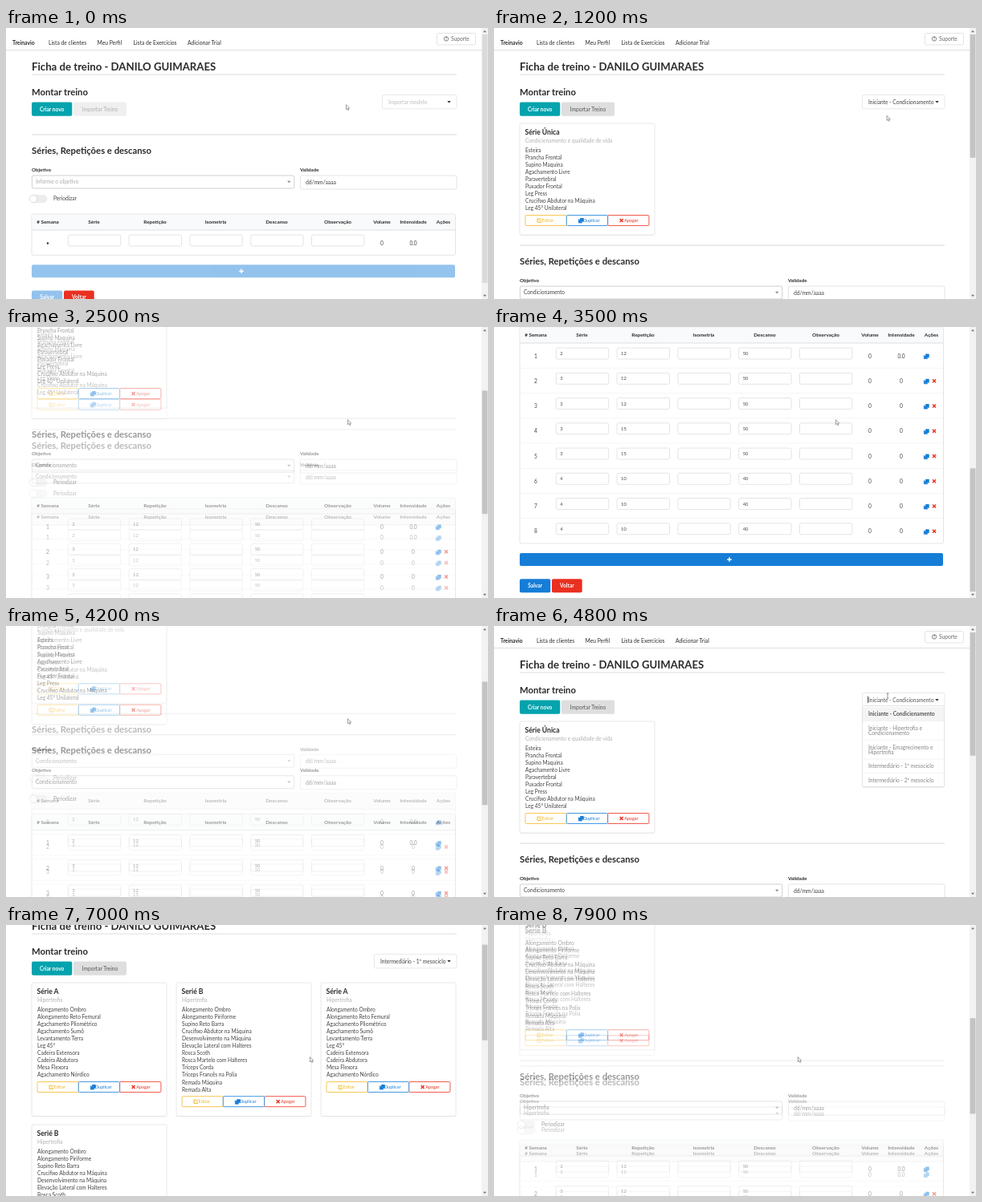
Write an HTML page that moves like this. It is 600x338 px and loops after 8 s.

```html
<!DOCTYPE html>
<html lang="pt-BR">
<head>
<meta charset="utf-8">
<title>Ficha de treino</title>
<style>
  html, body { margin: 0; width: 100%; height: 100%; overflow: hidden; background: #fff; }
  svg { display: block; width: 600px; height: 338px; font-family: Lato, "Open Sans", sans-serif; }
  text { white-space: pre; }
</style>
</head>
<body>
<svg id="stage" viewBox="0 0 600 338" xmlns="http://www.w3.org/2000/svg"></svg>
<script>
const LOOP = 8000, STEP = 100, SMEAR = 50;
const INK = '#2b2b2b', BODY = '#444', LINE = '#dedede';
const BLUE = '#167dd7', RED = '#ea3020', TEAL = '#05a3ad', GOLD = '#f4b928';

// Drawing helpers
const text = (x, y, s, o = {}) =>
  `<text x="${x}" y="${y}" font-size="${o.size || 6.6}" fill="${o.fill || (o.bold ? INK : BODY)}"` +
  ` font-weight="${o.bold ? 700 : 400}" text-anchor="${o.mid ? 'middle' : 'start'}">${s}</text>`;
const box = (x, y, w, h, fill, stroke = 'none', r = 2) =>
  `<rect x="${x}" y="${y}" width="${w}" height="${h}" rx="${r}" fill="${fill}" stroke="${stroke}" stroke-width=".8"/>`;
const rule = (y, x1 = 32, x2 = 561, c = LINE) =>
  `<path d="M${x1} ${y}H${x2}" stroke="${c}" stroke-width="1"/>`;
const arrow = (x, y, c = INK) => `<path d="M${x - 2.2} ${y - 1.2}h4.4l-2.2 2.5z" fill="${c}"/>`;
const faded = (on, s) => `<g opacity="${on ? .46 : 1}">${s}</g>`;
const button = (x, y, w, h, fill, s) =>
  box(x, y, w, h, fill) + text(x + w / 2, y + h / 2 + 2.4, s, { bold: 1, mid: 1, fill: '#fff' });

const icons = {
  copy: (x, y, c) => box(x + 1.8, y - 3, 4.6, 4.6, c, 'none', .5) +
    `<path d="M${x + .9} ${y - 1.2}h-.9v4.2h4.3v-.9" fill="${c}" stroke="${c}" stroke-width=".7"/>`,
  cross: (x, y, c) => `<path d="M${x} ${y - 2}l4 4m0-4l-4 4" stroke="${c}" stroke-width="1.5"/>`,
  edit: (x, y, c) => `<path d="M${x + 3} ${y - 2}h-3v4.4h4.4v-2M${x + 1.8} ${y + .8}l3.6-3.6" fill="none" stroke="${c}" stroke-width="1"/>`
};

// Content
const seriesA = ['Série A', 'Hipertrofia', 'Alongamento Ombro', 'Alongamento Reto Femural', 'Agachamento Pliométrico',
  'Agachamento Sumô', 'Levantamento Terra', 'Leg 45°', 'Cadeira Extensora', 'Cadeira Abdutora', 'Mesa Flexora',
  'Agachamento Nórdico'];
const seriesB = ['Serié B', 'Hipertrofia', 'Alongamento Ombro', 'Alongamento Piriforme', 'Supino Reto Barra',
  'Crucifixo Abdutor na Máquina', 'Desenvolvimento na Máquina', 'Elevação Lateral com Halteres', 'Rosca Scoth',
  'Rosca Martelo com Halteres', 'Tríceps Corda', 'Tríceps Francês na Polia', 'Remada Máquina', 'Remada Alta'];
const single = ['Série Única', 'Condicionamento e qualidade de vida', 'Esteira', 'Prancha Frontal', 'Supino Maquina',
  'Agachamento Livre', 'Paravertebral', 'Puxador Frontal', 'Leg Press', 'Crucifixo Abdutor na Máquina',
  'Leg 45° Unilateral'];
const weeks = [[2, 12, 50], [3, 12, 50], [3, 12, 50], [3, 15, 50], [3, 15, 50], [4, 10, 40], [4, 10, 40], [4, 10, 40]];

const views = [
  { shift: 0, rows: 1, cards: [] },
  { shift: 138, rows: 8, goal: 'Condicionamento', cards: [[32, 119, 139, single]] },
  { shift: 343, rows: 8, goal: 'Hipertrofia', cards: [[32, 119, 166.5, seriesA], [212, 119, 166.5, seriesB],
    [392, 119, 166.5, seriesA], [32, 296, 166.5, seriesB]] }
];
views.forEach(v => v.height = 320 + v.shift + v.rows * 31.25);

function card([x, y, h, [name, note, ...items]]) {
  const top = y + 114.5 + 9.06 * (items.length - 9);
  const actions = [['edit', 'Editar', GOLD], ['copy', 'Duplicar', BLUE], ['cross', 'Apagar', RED]];
  const order = [0, 2, 1];
  return box(x, y + .8, 168, h, '#ececec') + box(x, y, 168, h, '#fff', '#e3e3e3') +
    text(x + 6.5, y + 13.9, name, { size: 8.6, bold: 1 }) +
    text(x + 7, y + 23.7, note, { fill: '#b0b0b0' }) +
    items.map((s, i) => text(x + 7, y + 35.9 + 9.06 * i, s)).join('') +
    order.map(i => {
      const [icon, label, c] = actions[i], bx = x + 7 + 51.3 * i;
      return box(bx, top, 51.3, 13, '#fff', c, 1.2) + icons[icon](bx + 15, top + 6.5, c) +
        text(bx + 20.6, top + 8.6, label, { size: 5.6, fill: c });
    }).join('');
}

function header() {
  const links = [[53, 'Lista de clientes'], [113.5, 'Meu Perfil'], [158.5, 'Lista de Exercícios'], [226, 'Adicionar Trial']];
  return text(8, 20.8, 'Treinavio', { bold: 1, size: 6.8 }) +
    links.map(([x, s]) => text(x, 20.8, s, { size: 6.75, fill: INK })).join('') +
    rule(27.5, 0, 592) + box(536.5, 6.5, 48, 14.5, '#fff', LINE) +
    '<circle cx="548" cy="13.5" r="2.7" fill="none" stroke="#666" stroke-width=".8"/>' +
    text(548, 15.3, '?', { size: 4.6, mid: 1, bold: 1, fill: '#666' }) + text(554, 15.9, 'Suporte', { fill: '#666' }) +
    text(32, 52.8, 'Ficha de treino - DANILO GUIMARAES', { size: 13.2, bold: 1 }) + rule(58) +
    text(32, 84, 'Montar treino', { size: 11.3, bold: 1 }) + button(32, 92.6, 50.3, 17.2, TEAL, 'Criar novo');
}

function table(v) {
  const empty = v.rows === 1, end = 252 + v.rows * 31.25;
  const heads = [[52, '# Semana'], [109.5, 'Série'], [185.5, 'Repetição'], [261, 'Isometria'], [337, 'Descanso'],
    [413, 'Observação'], [468, 'Volume'], [507, 'Intensidade'], [544.5, 'Ações']];
  const row = (week, i) => {
    const y = 252 + 31.25 * i, values = [week[0], week[1], '', week[2], ''];
    return (i ? rule(y, 32, 559, '#f5f5f5') : '') +
      text(52, y + 18.6, empty ? '•' : i + 1, { mid: 1 }) +
      values.map((n, k) => box(77.3 + 75.8 * k, y + 6, 65.4, 14, '#fff', LINE) +
        (empty ? '' : text(82.3 + 75.8 * k, y + 15, n, { size: 5.8 }))).join('') +
      text(468, y + 18.6, 0, { mid: 1 }) + text(507, y + 18.6, i ? '0' : '0.0', { mid: 1 }) +
      (empty ? '' : icons.copy(535.3, y + 16.6, BLUE)) + (i ? icons.cross(546, y + 16, RED) : '');
  };
  return box(32, 232, 527.5, end - 232, '#fff', LINE) + box(32.4, 232.4, 526.7, 19.4, '#f9fafb') + rule(252, 32, 559) +
    heads.map(([x, s]) => text(x, 244, s, { size: 6.4, bold: 1, mid: 1 })).join('') +
    weeks.slice(0, v.rows).map(row).join('') +
    faded(empty, box(32, end + 12, 527, 16, BLUE) +
      `<path d="M290.2 ${end + 20}h5.6m-2.8-2.8v5.6" stroke="#fff" stroke-width="1.5"/>`) +
    faded(empty, button(32, end + 44.3, 38.3, 17, BLUE, 'Salvar')) + button(72, end + 44.3, 37.7, 17, RED, 'Voltar');
}

function form(v) {
  return `<g transform="translate(0 ${v.shift})">` + rule(133, 32, 561, '#d6d6d6') +
    text(32, 156.8, 'Séries, Repetições e descanso', { size: 11.3, bold: 1 }) +
    text(32, 179.2, 'Objetivo', { size: 6.2, bold: 1 }) + text(366, 179.2, 'Validade', { size: 6.2, bold: 1 }) +
    box(32.4, 184, 326.4, 16, '#fff', '#c4c4c4') +
    text(37, 194.4, v.goal || 'Informe o objetivo', { fill: v.goal ? BODY : '#aaa' }) + arrow(352.3, 192, '#888') +
    box(366.4, 184, 194.6, 17, '#fff', LINE) + text(373, 195, 'dd/mm/aaaa', { size: 6.8 }) +
    box(30, 208, 21.5, 10, '#ececec', 'none', 5) +
    '<circle cx="34" cy="213" r="4.8" fill="#fff" stroke="#d4d4d4" stroke-width=".8"/>' +
    text(59, 215.2, 'Periodizar') + table(v) + '</g>';
}

const view = v => '<g class="view">' + box(0, 0, 600, 1000, '#fff', 'none', 0) + header() +
  faded(!v.goal, box(84, 92.6, 66, 17.2, '#dedede') + text(117, 103.8, 'Importar Treino', { mid: 1, fill: '#555' })) +
  v.cards.map(card).join('') + form(v) + '</g>';

const choices = ['Iniciante - Condicionamento', 'Intermediário - 1º mesociclo'];
const menu = '<g id="menu">' + box(458.4, 100.5, 102.2, 101, '#e0e0e0') + box(458.4, 99.5, 102.2, 101, '#fff', LINE) +
  box(459, 101, 101, 17.5, '#f4f4f4', 'none', 0) + text(466, 112.2, choices[0], { bold: 1, fill: '#555' }) +
  [[130, 'Iniciante - Hipertrofia e'], [136.4, 'Condicionamento'], [153.6, 'Iniciante - Emagrecimento e'],
    [160, 'Hipertrofia'], [177.2, choices[1]], [194.6, 'Intermediário - 2º mesociclo']]
    .map(([y, s]) => text(466, y, s, { fill: '#858585' })).join('') +
  [118.5, 142, 166, 183.5].map(y => rule(y, 459, 560, '#f3f3f3')).join('') +
  '<path d="M465.5 87.5v8.5" stroke="#333" stroke-width=".8"/></g>';
const picker = '<g id="picker"><rect id="field" y="83.4" height="17.4" rx="2" fill="#fff" stroke="#e3e3e3" stroke-width=".8"/>' +
  '<text id="label" y="94.6" font-size="6.6"></text>' + arrow(551.5, 92.2) + menu + '</g>';

const pointer = '<path class="tip" d="M-1.6-3.4v6l1.4-1.2 1 2.2 1-.5-1-2h1.8z" fill="#fff" stroke="#777" stroke-width=".7"/>' +
  '<path class="beam" d="M-1.3-3h2.6M0-3v6M-1.3 3h2.6" fill="none" stroke="#666" stroke-width=".7"/>';

const $ = id => document.getElementById(id);
$('stage').innerHTML =
  `<g id="world"><g id="main"><g id="page">${views.map(view).join('')}${picker}</g></g>` +
  '<g id="trail" opacity=".4"><use href="#page"/></g></g>' +
  box(592, 0, 8, 338, '#f2f2f2', 'none', 0) + '<path d="M594 5.3h4l-2-2.5zM594 332.7h4l-2 2.5z" fill="#777"/>' +
  '<rect id="thumb" x="592.6" width="6.8"/>' +
  `<g id="cursor">${pointer}</g><g id="echo" opacity=".5">${pointer}</g>`;
const layers = [...document.querySelectorAll('.view')];

// Timeline
const scrolls = [[0, 0], [1850, 0], [2100, 47], [2700, 212], [3250, 355], [3400, 370], [3750, 370], [4100, 188],
  [4400, 30], [4550, 0], [6600, 0], [6850, 47], [7150, 47], [7350, 141], [7600, 235], [7750, 282], [7850, 300], [7950, 314]];
const path = [[0, 425, 99], [100, 425, 99], [300, 500, 92], [450, 500, 92], [650, 495, 110], [1280, 490, 113],
  [1520, 427, 119], [4300, 427, 119], [4700, 490, 87], [4900, 490, 87], [5250, 500, 175], [5400, 500, 175],
  [5640, 468, 167], [6000, 468, 167], [6300, 380, 168]];
const beams = [[300, 500], [4600, 5000], [5600, 6000]];
// time, view, field x, label, colour, menu open
const states = [
  [0, 0, 468, 'Importar modelo', '#bdbdbd', false],
  [400, 0, 458, 'Importar modelo', '#cfcfcf', true],
  [900, 0, 458, choices[0], '#999', false],
  [1000, 0, 458, choices[0], BODY, false],
  [1200, 1, 458, choices[0], BODY, false],
  [4700, 1, 458, choices[0], '#555', true],
  [5400, 1, 458, choices[1], BODY, false],
  [5500, 2, 458, choices[1], BODY, false]
];

function sample(keys, t) {
  const i = keys.findIndex(k => k[0] > t);
  if (i < 0) return keys[keys.length - 1].slice(1);
  if (i === 0) return keys[0].slice(1);
  const a = keys[i - 1], b = keys[i], p = (t - a[0]) / (b[0] - a[0]);
  return a.slice(1).map((v, k) => v + (b[k + 1] - v) * p);
}
const set = (el, attrs) => { for (const k in attrs) el.setAttribute(k, attrs[k]); };
const show = (el, on) => el.setAttribute('display', on ? 'inline' : 'none');
const move = (id, x, y) => set($(id), { transform: `translate(${x} ${y})` });

function draw(t) {
  const [, n, x, label, fill, open] = states.filter(s => s[0] <= t).pop();
  layers.forEach((el, i) => show(el, i === n));
  set($('field'), { x: x + .4, width: 560.6 - x });
  set($('label'), { x: x + 8, fill });
  $('label').textContent = label;
  show($('menu'), open);

  const past = Math.max(0, t - SMEAR);
  const [y] = sample(scrolls, t), [oldY] = sample(scrolls, past);
  const moving = Math.abs(y - oldY) > 1;
  move('main', 0, -y);
  move('trail', 0, -oldY);
  show($('trail'), moving);
  set($('world'), { opacity: moving ? .8 : 1 });
  const scale = 322 / views[n].height;
  set($('thumb'), { y: 8 + y * scale, height: 338 * scale, fill: n ? '#c3c3c3' : '#dadada' });

  const [cx, cy] = sample(path, t), [ox, oy] = sample(path, past);
  move('cursor', cx, cy);
  move('echo', ox, oy);
  show($('echo'), Math.hypot(cx - ox, cy - oy) > 1);
  const beam = beams.some(([a, b]) => t >= a && t < b);
  document.querySelectorAll('.tip').forEach(el => show(el, !beam));
  document.querySelectorAll('.beam').forEach(el => show(el, beam));
}

const start = performance.now();
function tick() {
  const t = Math.max(0, performance.now() - start) % LOOP;
  draw(Math.floor(t / STEP) * STEP);
  requestAnimationFrame(tick);
}
tick();
</script>
</body>
</html>
```
